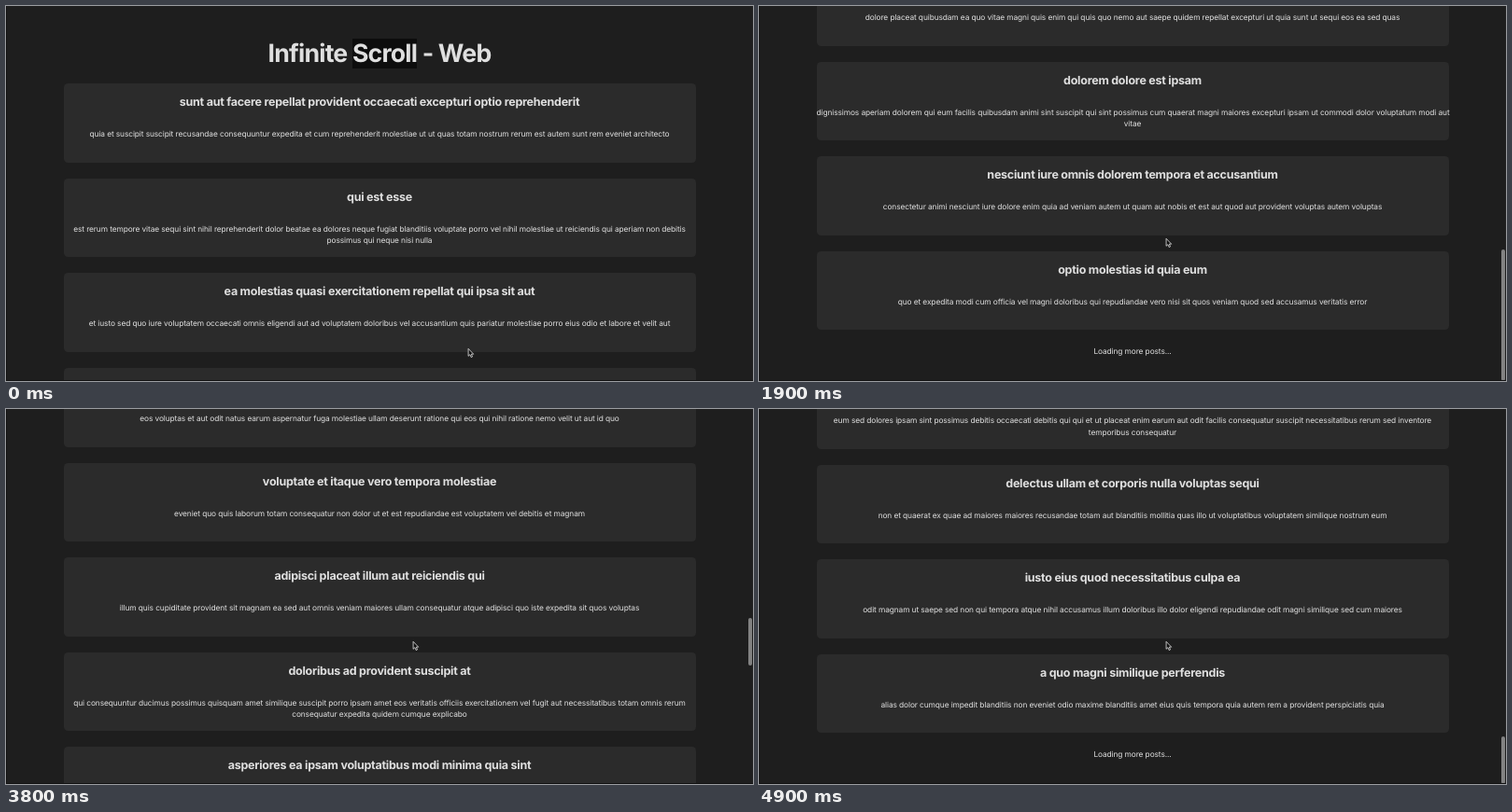
These frames come from a looping animation (800 px wide and 402 px high, 5000 ms). An HTML page:

```html
<!DOCTYPE html>
<html lang="en">
<head>
<meta charset="utf-8">
<title>Infinite Scroll</title>
<style>
  html, body { margin: 0; width: 100%; height: 100%; overflow: hidden; background: #1e1e1e; }
  #stage {
    position: relative; width: 800px; height: 402px; overflow: hidden;
    background: #1e1e1e; color: #dfdfdf; text-align: center; white-space: pre;
    font: 8.35px/12.6px Inter, "Liberation Sans", sans-serif;
    letter-spacing: -.012em; text-rendering: geometricPrecision;
  }
  #stage * { margin: 0; box-sizing: border-box; }
  #page, h1, .card, #loading, #thumb, #cursor, #edge { position: absolute; }
  #page { left: 0; top: 0; width: 800px; }
  h1 { top: 34.5px; width: 800px; font-size: 26.7px; line-height: 32px; font-weight: 700; letter-spacing: -.031em; }
  h1 span { background: #0d0d0d; }
  .card { left: 61.5px; width: 677px; height: 84.5px; border-radius: 4.5px; background: #2b2b2b; }
  h2 { padding-top: 13.2px; height: 49.4px; font-size: 12.5px; line-height: 16px; font-weight: 700; letter-spacing: -.02em; }
  #loading { width: 800px; }
  #thumb { left: 795px; width: 4px; border-radius: 2px; background: #828282; }
  #cursor { left: 0; top: 0; overflow: visible; }
  #edge { inset: 0; border: solid #121212; border-width: 0 0 1px 1px; }
</style>
</head>
<body>
<div id="stage">
  <div id="page"><h1>Infinite <span>Scroll</span> - Web</h1><p id="loading">Loading more posts...</p></div>
  <div id="thumb"></div>
  <div id="edge"></div>
  <svg id="cursor" width="8" height="12"><path d="M.5.6V8.6L2.3 7 3.6 9.9 4.9 9.3 3.7 6.5H6.1Z" fill="#111" stroke="#e8e8e8" stroke-width=".8"/></svg>
</div>
<script>
// One post per line: title / body, with | as a line break
const posts = `sunt aut facere repellat provident occaecati excepturi optio reprehenderit/quia et suscipit suscipit recusandae consequuntur expedita et cum reprehenderit molestiae ut ut quas totam nostrum rerum est autem sunt rem eveniet architecto
qui est esse/est rerum tempore vitae sequi sint nihil reprehenderit dolor beatae ea dolores neque fugiat blanditiis voluptate porro vel nihil molestiae ut reiciendis qui aperiam non debitis|possimus qui neque nisi nulla
ea molestias quasi exercitationem repellat qui ipsa sit aut/et iusto sed quo iure voluptatem occaecati omnis eligendi aut ad voluptatem doloribus vel accusantium quis pariatur molestiae porro eius odio et labore et velit aut
eum et est occaecati/ullam et saepe reiciendis voluptatem adipisci sit amet autem assumenda provident rerum culpa quis hic commodi nesciunt rem tenetur doloremque ipsam iure quis sunt|voluptatem rerum illo velit
nesciunt quas odio/repudiandae veniam quaerat sunt sed alias aut fugiat sit autem sed est voluptatem omnis possimus esse voluptatibus quis est aut tenetur dolor neque
dolorem eum magni eos aperiam quia/ut aspernatur corporis harum nihil quis provident sequi mollitia nobis aliquid molestiae perspiciatis et ea nemo ab reprehenderit accusantium quas voluptate dolores|velit et doloremque molestiae
magnam facilis autem/dolore placeat quibusdam ea quo vitae magni quis enim qui quis quo nemo aut saepe quidem repellat excepturi ut quia sunt ut sequi eos ea sed quas
dolorem dolore est ipsam/dignissimos aperiam dolorem qui eum facilis quibusdam animi sint suscipit qui sint possimus cum quaerat magni maiores excepturi ipsam ut commodi dolor voluptatum modi aut|vitae
nesciunt iure omnis dolorem tempora et accusantium/consectetur animi nesciunt iure dolore enim quia ad veniam autem ut quam aut nobis et est aut quod aut provident voluptas autem voluptas
optio molestias id quia eum/quo et expedita modi cum officia vel magni doloribus qui repudiandae vero nisi sit quos veniam quod sed accusamus veritatis error
et ea vero quia laudantium autem/delectus reiciendis molestiae occaecati non minima eveniet qui voluptatibus accusamus in eum beatae sit vel qui neque voluptates ut commodi qui incidunt ut animi commodi
in quibusdam tempore odit est dolorem/itaque id aut magnam praesentium quia et ea odit et ea voluptas et sapiente quia nihil amet occaecati quia id voluptatem incidunt ea est distinctio odio
dolorum ut in voluptas mollitia et saepe quo animi/aut dicta possimus sint mollitia voluptas commodi quo doloremque iste corrupti reiciendis voluptatem eius rerum sit cumque quod eligendi laborum minima perferendis|recusandae assumenda consectetur porro architecto ipsum ipsam
voluptatem eligendi optio/fuga et accusamus dolorum perferendis illo voluptas non doloremque neque facere ad qui dolorum molestiae beatae sed aut voluptas totam sit illum
eveniet quod temporibus/reprehenderit quos placeat velit minima officia dolores impedit repudiandae molestiae nam voluptas recusandae quis delectus officiis harum fugiat vitae
sint suscipit perspiciatis velit dolorum rerum ipsa laboriosam odio/suscipit nam nisi quo aperiam aut asperiores eos fugit maiores voluptatibus quia voluptatem quis ullam qui in alias quia est consequatur magni mollitia accusamus ea|nisi voluptate dicta
fugit voluptas sed molestias voluptatem provident/eos voluptas et aut odit natus earum aspernatur fuga molestiae ullam deserunt ratione qui eos qui nihil ratione nemo velit ut aut id quo
voluptate et itaque vero tempora molestiae/eveniet quo quis laborum totam consequatur non dolor ut et est repudiandae est voluptatem vel debitis et magnam
adipisci placeat illum aut reiciendis qui/illum quis cupiditate provident sit magnam ea sed aut omnis veniam maiores ullam consequatur atque adipisci quo iste expedita sit quos voluptas
doloribus ad provident suscipit at/qui consequuntur ducimus possimus quisquam amet similique suscipit porro ipsam amet eos veritatis officiis exercitationem vel fugit aut necessitatibus totam omnis rerum|consequatur expedita quidem cumque explicabo
asperiores ea ipsam voluptatibus modi minima quia sint/repellat aliquid praesentium dolorem quo sed totam minus non itaque nihil labore molestiae sunt dolor eveniet hic recusandae veniam tempora et tenetur expedita sunt
dolor sint quo a velit explicabo quia nam/eos qui et ipsum ipsam suscipit aut sed omnis non odio expedita earum mollitia molestiae aut atque rem suscipit nam impedit esse
maxime id vitae nihil numquam/veritatis unde neque eligendi quae quod architecto quo neque vitae est illo sit tempora doloremque fugit quod et et vel beatae sequi ullam sed tenetur perspiciatis
autem hic labore sunt dolores incidunt/enim et ex nulla omnis voluptas quia qui voluptatem consequatur numquam aliquam sunt totam recusandae id dignissimos aut sed asperiores deserunt
rem alias distinctio quo quis/ullam consequatur ut omnis quis sit vel consequuntur ipsa eligendi ipsum molestiae et omnis error nostrum molestiae illo tempore quia et distinctio
est et quae odit qui non/similique esse doloribus nihil accusamus omnis dolorem fuga consequuntur reprehenderit fugit recusandae temporibus perspiciatis cum ut laudantium omnis aut molestiae vel|vero
quasi id et eos tenetur aut quo autem/eum sed dolores ipsam sint possimus debitis occaecati debitis qui qui et ut placeat enim earum aut odit facilis consequatur suscipit necessitatibus rerum sed inventore|temporibus consequatur
delectus ullam et corporis nulla voluptas sequi/non et quaerat ex quae ad maiores maiores recusandae totam aut blanditiis mollitia quas illo ut voluptatibus voluptatem similique nostrum eum
iusto eius quod necessitatibus culpa ea/odit magnam ut saepe sed non qui tempora atque nihil accusamus illum doloribus illo dolor eligendi repudiandae odit magni similique sed cum maiores
a quo magni similique perferendis/alias dolor cumque impedit blanditiis non eveniet odio maxime blanditiis amet eius quis tempora quia autem rem a provident perspiciatis quia`.split("\n");

const LOOP = 5000, TICK = 100, VIEW = 402, PITCH = 101.5;
const TRACK_TOP = 4, TRACK = VIEW - TRACK_TOP;
const $ = id => document.getElementById(id);
const maxScroll = count => count * PITCH - 281;

const cards = posts.map((post, i) => {
  const [title, body] = post.split("/");
  const card = document.createElement("div");
  card.className = "card";
  card.style.top = 83 + i * PITCH + "px";
  card.innerHTML = `<h2>${title}</h2><p>${body.replace("|", "\n")}</p>`;
  $("page").append(card);
  return card;
});

// Each flick speeds up to the page end, overshoots and springs back
const flicks = [
  { start: 1100, steps: 5, from: 0, end: maxScroll(10), power: 2.26, over: 6, decay: 100 },
  { start: 2700, steps: 4, from: 734, end: maxScroll(20), power: 2.51, over: 13, decay: 370 },
  { start: 3900, steps: 5, from: 1751, end: maxScroll(30), power: 2.26, over: 20, decay: 100 },
];

function scrollAt(t) {
  const flick = flicks.findLast(f => t >= f.start);
  if (!flick) return 0;
  const { start, steps, from, end, power, over, decay } = flick;
  const step = (t - start) / TICK;
  if (step < steps) return from + 18 * (step + 1) ** power;
  return end + over * Math.exp((steps - step) * TICK / decay);
}

function draw() {
  const t = Math.floor(performance.now() % LOOP / TICK) * TICK;
  const count = t < 2200 ? 10 : t < 3700 ? 20 : 30;
  const scroll = Math.round(scrollAt(t)), max = maxScroll(count);

  $("page").style.transform = `translateY(${-scroll}px)`;
  cards.forEach((card, i) => card.style.display = i < count ? "" : "none");
  $("loading").style.top = count * PITCH + 84.2 + "px";

  const size = TRACK * VIEW / (max + VIEW);
  $("thumb").style.display = t < flicks[0].start ? "none" : "";
  $("thumb").style.height = size + "px";
  $("thumb").style.top = TRACK_TOP + (TRACK - size) * Math.min(1, scroll / max) + "px";

  const k = Math.max(0, Math.min(1, (t - 300) / 400)), ease = k * k * (3 - 2 * k);
  $("cursor").style.transform = `translate(${494.6 - 59 * ease}px, ${366.7 - 118 * ease}px)`;
  requestAnimationFrame(draw);
}
draw();
</script>
</body>
</html>
```
